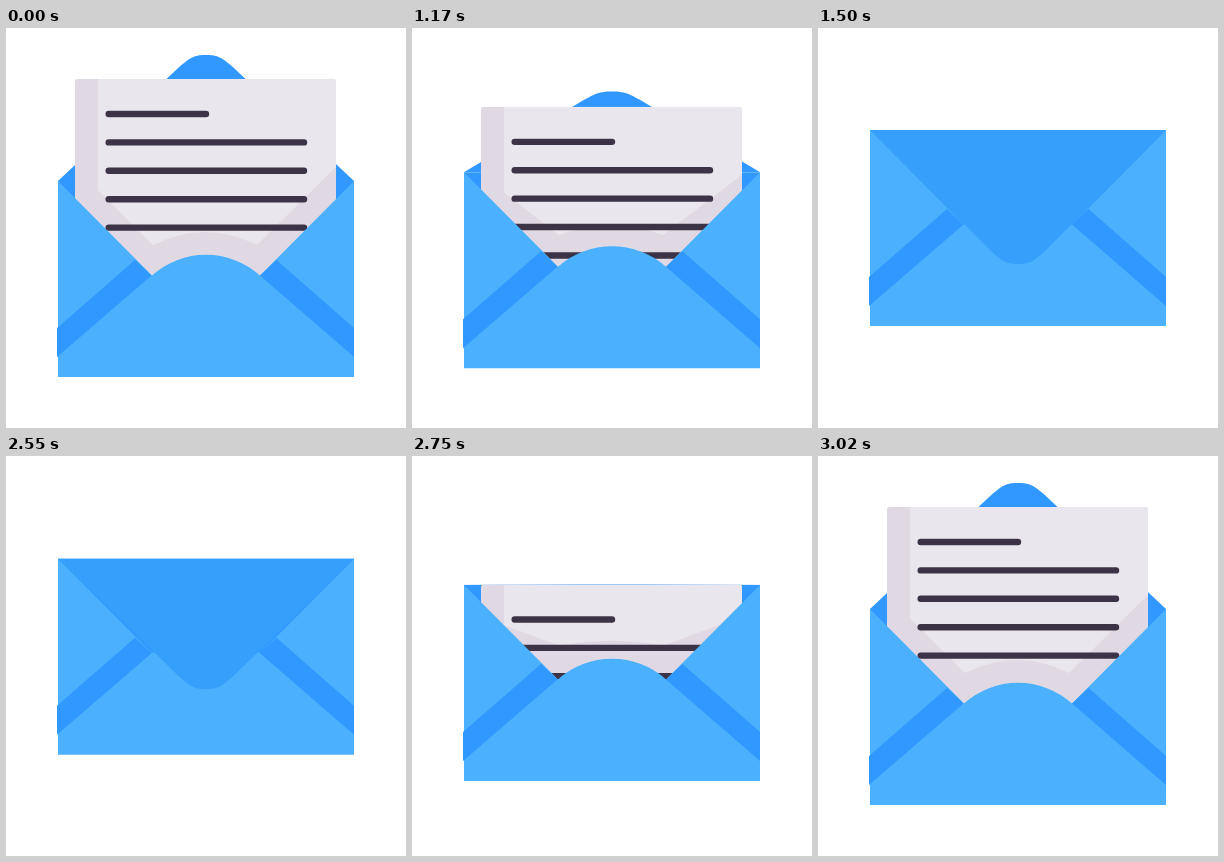
Write an HTML page with a canvas that moves like this. It is 400 by 400 pixels and loops after 3050 ms.

```html
<!DOCTYPE html>
<html lang="en">
<head>
<meta charset="utf-8">
<title>Envelope</title>
<style>
  html, body { margin: 0; width: 100%; height: 100%; overflow: hidden; background: #fff; }
  canvas { display: block; width: 100vmin; height: 100vmin; }
</style>
</head>
<body>
<canvas id="stage" width="400" height="400"></canvas>
<script>
const ctx = document.getElementById('stage').getContext('2d');
const LOOP = 3050, MOVE = 500, CLOSE_AT = 1000, OPEN_AT = 2525;
const FOLD = 0.475; // progress at which the flap lies flat
const color = {
  pocket: '#4bb1fe', back: '#3098ff', flap: '#369ffc',
  paper: '#eae6ed', shade: '#e0d9e3', ink: '#3c3446'
};

const FLAP = new Path2D('M52 0L170 118C185 133 190 134 200 134C210 134 215 133 230 118L348 0Z');
const POCKET = new Path2D('M52 0L146 94.5A81 81 0 0 1 254 94.5L348 0V196H52Z');
const BANDS = new Path2D('M129 79L145.5 94.5L51 176V147ZM270.5 79L254 94.5L348 176V147Z');

const clamp = x => Math.min(1, Math.max(0, x));
const bezier = (a, b, u) => 3 * u * (1 - u) ** 2 * a + 3 * u * u * (1 - u) * b + u ** 3;

function ease(t) {
  if (t <= 0 || t >= 1) return clamp(t);
  let low = 0, high = 1;
  for (let i = 0; i < 24; i++) {
    const mid = (low + high) / 2;
    if (bezier(0.54, 0.59, mid) < t) low = mid; else high = mid;
  }
  return bezier(0, 0.92, low);
}

// 0 = open, 1 = closed
function closedAmount(ms) {
  return ms < OPEN_AT
    ? ease((ms - CLOSE_AT) / MOVE)
    : ease(1 - (ms - OPEN_AT) / MOVE);
}

function fill(path, style, y, scaleY = 1) {
  ctx.save();
  ctx.translate(0, y);
  ctx.scale(1, scaleY);
  ctx.fillStyle = style;
  ctx.fill(path);
  ctx.restore();
}

function drawPaper(y, bottom, shadeScale) {
  if (y >= bottom) return;
  ctx.save();
  ctx.beginPath();
  ctx.roundRect(69, y, 261, bottom - y, [3, 3, 0, 0]);
  ctx.clip();
  ctx.fillStyle = color.shade;
  ctx.fillRect(69, y, 261, bottom - y);
  const face = new Path2D('M92 0V111L147 166Q200 140 251 166L330 88V0Z');
  fill(face, color.paper, y, shadeScale);

  ctx.strokeStyle = color.ink;
  ctx.lineWidth = 6.4;
  ctx.lineCap = 'round';
  for (let i = 0; i < 5; i++) {
    const lineY = y + 35 + 28.4 * i;
    ctx.beginPath();
    ctx.moveTo(102.7, lineY);
    ctx.lineTo(i ? 298 : 200, lineY);
    ctx.stroke();
  }
  ctx.restore();
}

function draw(p) {
  const top = 153 - 51 * p;
  const flapScale = p < FOLD ? 0.94 * (p / FOLD - 1) : (p - FOLD) / (1 - FOLD);
  ctx.fillStyle = '#fff';
  ctx.fillRect(0, 0, 400, 400);

  if (flapScale < 0) fill(FLAP, color.back, top, flapScale);
  ctx.fillStyle = color.back;
  ctx.fillRect(52, top, 296, 190);
  drawPaper(51 + 164 * p, top + 190, Math.max(0, 1 - 1.34 * p));
  fill(POCKET, color.pocket, top);
  fill(BANDS, color.back, top);
  if (flapScale > 0) fill(FLAP, color.flap, top, flapScale);
}

// 40 poses per second, held for 20 and 30 ms in turn
function poseTime(ms) {
  const step = 2 * Math.floor(ms / 50) + (ms % 50 >= 20 ? 1 : 0);
  return step * 25;
}

const start = performance.now();
function tick() {
  const ms = (performance.now() - start) % LOOP;
  draw(closedAmount(poseTime(ms)));
  requestAnimationFrame(tick);
}
tick();
</script>
</body>
</html>
```
